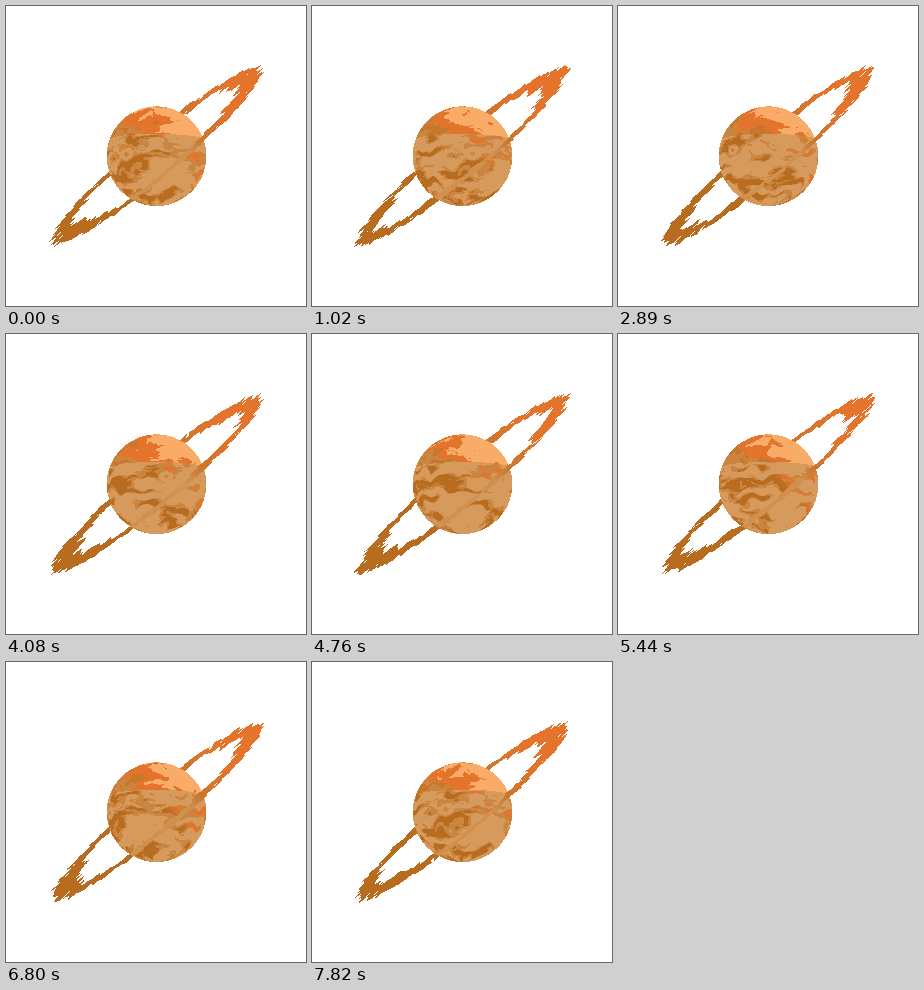
An HTML page with a canvas for the animation above (7.99 s loop, 300 by 300 pixels).

```html
<!DOCTYPE html>
<html lang="en">
<head>
<meta charset="utf-8">
<title>Ringed planet</title>
<style>
  html, body { margin: 0; height: 100%; overflow: hidden; background: #fff; }
  canvas { display: block; width: 100vw; height: 100vh; image-rendering: pixelated; }
</style>
</head>
<body>
<canvas id="stage" width="300" height="300"></canvas>
<script>
const SIZE = 300, LOOP = 7990, STEP = 170, TURN = 7450;
const CX = 150.5, CY = 150.2, RADIUS = 49.8;
const RING_A = 142, RING_B = 21.5;
const AXIS_X = 0.767, AXIS_Y = -0.642;
const ctx = document.getElementById('stage').getContext('2d');
const image = ctx.createImageData(SIZE, SIZE);

const BROWN = [184, 108, 32], COPPER = [200, 118, 44], ORANGE = [228, 116, 44];
const OCHRE = [202, 134, 64], TAN = [214, 154, 92], PEACH = [248, 172, 104];

// Storms: longitude at time zero, latitude, size (radians)
const STORMS = [[-0.65, 0.06, 0.3], [-2.34, -0.1, 0.16], [3.04, -0.04, 0.26], [-0.31, -0.06, 0.13]];

const clamp = v => Math.max(0, Math.min(1, v));
const smooth = (a, b, v) => { const t = clamp((v - a) / (b - a)); return t * t * (3 - 2 * t); };
const lerp = (a, b, t) => a + (b - a) * t;
const mix = (a, b, t) => a.map((v, i) => lerp(v, b[i], t));

function hash(x, y, z) {
  let h = Math.imul(x, 374761393) ^ Math.imul(y, 668265263) ^ Math.imul(z, 1274126177);
  h = Math.imul(h ^ (h >>> 13), 1103515245);
  return ((h ^ (h >>> 16)) >>> 0) / 4294967296;
}

function noise(x, y, z) {
  const i = Math.floor(x), j = Math.floor(y), k = Math.floor(z);
  const fx = smooth(0, 1, x - i), fy = smooth(0, 1, y - j), fz = smooth(0, 1, z - k);
  const row = (b, c) => lerp(hash(i, b, c), hash(i + 1, b, c), fx);
  const plane = c => lerp(row(j, c), row(j + 1, c), fy);
  return lerp(plane(k), plane(k + 1), fz);
}

const fbm = (x, y, z) =>
  0.55 * noise(x, y, z) + 0.3 * noise(x * 2.1, y * 2.1, z * 2.1) + 0.15 * noise(x * 4.3, y * 4.3, z * 4.3);

// Noise around a circle, so that it closes after one turn
const around = (angle, detail, seed) =>
  noise(Math.cos(angle) * detail + 50, Math.sin(angle) * detail + 50, seed);

function capColor(lat, u, n) {
  const w = u + (n - 0.5) * -70 - 8 * smooth(-0.5, -0.36, lat);
  if (w > 24) return PEACH;
  if (w > 2) return ORANGE;
  return n > 0.55 ? COPPER : OCHRE;
}

function planetColor(dx, dy, u, spin) {
  const x = dx / RADIUS, y = dy / RADIUS;
  const z = Math.sqrt(Math.max(0, 1 - x * x - y * y));
  const lat = y + 0.12 * z;
  const lon = Math.atan2(x, z) - spin;
  const px = Math.cos(lon) * 2.2 + 20, pz = Math.sin(lon) * 2.2 + 20;
  const warp = noise(px * 1.8, lat * 5 + 40, pz * 1.8) - 0.5;
  let n = fbm(px, lat * 8 + 30 + warp * 1.6, pz);
  if (lat < -0.34) return capColor(lat, u, n);

  for (const [lon0, lat0, size] of STORMS) {
    const turn = Math.atan2(Math.sin(lon - lon0), Math.cos(lon - lon0));
    const d = Math.hypot(turn, (lat - lat0) * 1.4) / size;
    if (d < 1) n = lerp(0.52 + 0.09 * Math.cos(d * 8), n, d * d);
  }
  const strip = 1 - smooth(-0.34, -0.18, lat);
  const limit = 0.55 + 0.05 * smooth(-0.7, 0.5, x) + 0.08 * strip;
  if (n > limit + 0.05) return mix(BROWN, ORANGE, smooth(8, 20, u));
  return n > limit - 0.05 ? OCHRE : TAN;
}

function inRing(u, v, spin) {
  const r = Math.hypot(u / RING_A, v / RING_B);
  if (r < 0.55 || r > 1) return false;
  const a = Math.atan2(v / RING_B, u / RING_A) + spin + r * 0.25;
  const outer = 0.88 + 0.04 * around(a, 8, 7) + 0.1 * around(a, 18, 11);
  const inner = 0.57 + 0.16 * around(a, 2.5, 3) + 0.1 * around(a, 9, 7) + 0.07 * around(a, 18, 17);
  const slit = noise(Math.cos(a) * 16 + 80, Math.sin(a) * 16 + 80, r * 9);
  return r > inner && r < outer && slit < 0.89;
}

function draw(time) {
  const spin = time / TURN * 2 * Math.PI;
  const data = image.data;
  data.fill(255);
  for (let y = 54; y < 248; y++) {
    for (let x = 36; x < 266; x++) {
      const dx = x + 0.5 - CX, dy = y + 0.5 - CY;
      const u = dx * AXIS_X + dy * AXIS_Y, v = -dx * AXIS_Y + dy * AXIS_X;
      const onPlanet = dx * dx + dy * dy < RADIUS * RADIUS;
      if (!onPlanet && Math.abs(v) > RING_B + 1) continue;
      const ring = (!onPlanet || v > 0) && inRing(u, v, spin);
      let color;
      if (onPlanet) color = ring ? mix(mix(OCHRE, TAN, 0.5), COPPER, smooth(25, 48, u)) : planetColor(dx, dy, u, spin);
      else if (ring) color = mix(mix(BROWN, COPPER, smooth(-70, 45, u)), ORANGE, smooth(25, 95, u));
      if (color) data.set(color, (y * SIZE + x) * 4);
    }
  }
  ctx.putImageData(image, 0, 0);
}

let lastStep = -1;
const start = performance.now();
function tick() {
  const step = Math.floor((performance.now() - start) % LOOP / STEP);
  if (step !== lastStep) draw((lastStep = step) * STEP);
  requestAnimationFrame(tick);
}
tick();
</script>
</body>
</html>
```
